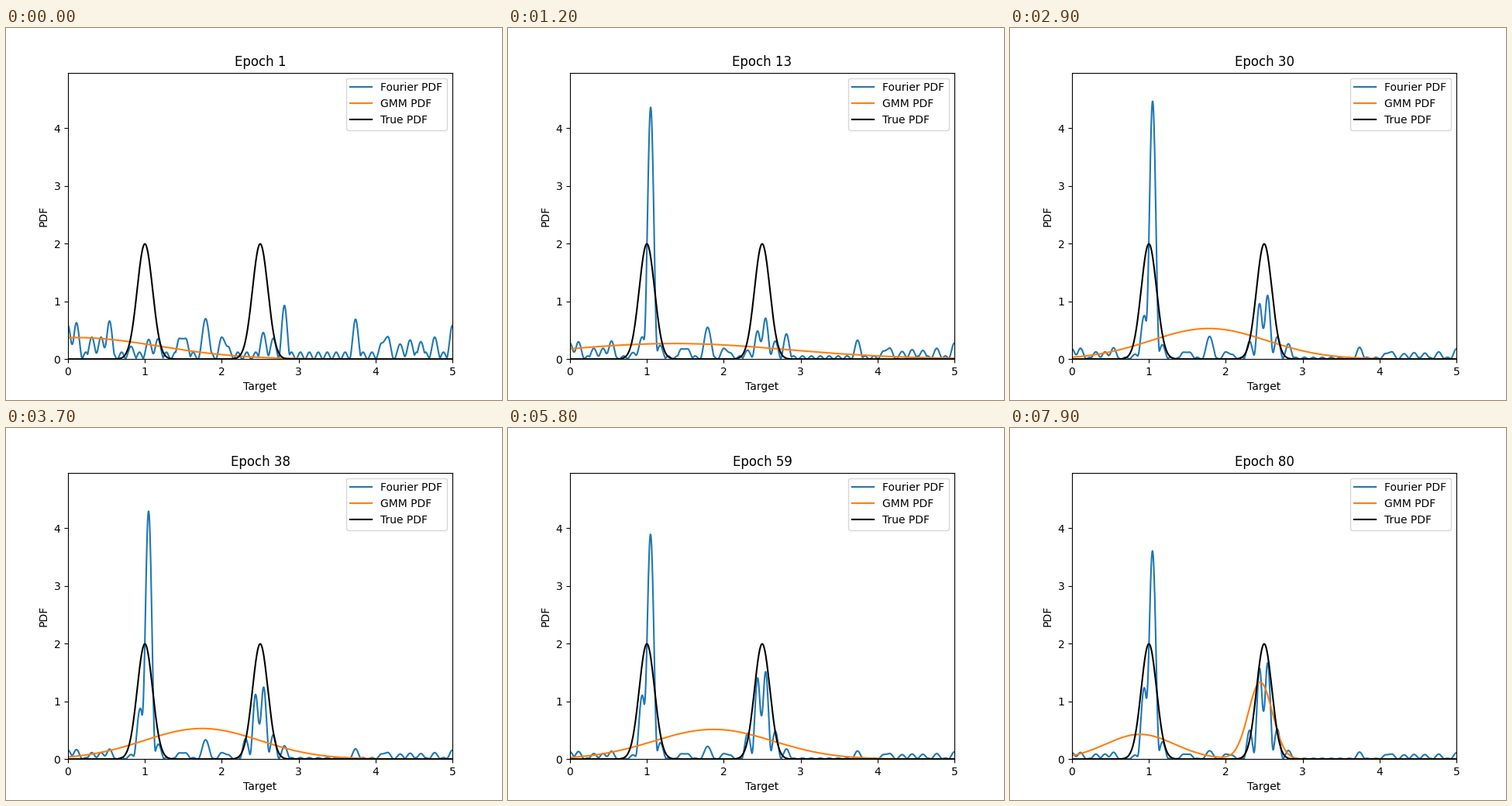
These frames come from a looping animation (640 px wide and 480 px high, 8000 ms). A matplotlib script:

```python
import numpy as np
import matplotlib.pyplot as plt
from matplotlib.animation import FuncAnimation

FRAMES = 80
PERIOD = 5
x = np.linspace(0, PERIOD, 1000)

# Random lobes before training: centre, height
initial = [
    (0, .58), (.11, .63), (.31, .38), (.43, .38), (.54, .66), (.82, .22),
    (1.05, .34), (1.17, .35), (1.45, .36), (1.53, .36), (2, .38), (2.08, .22),
    (2.54, .46), (2.67, .36), (2.815, .93), (3.74, .69), (4.08, .28),
    (4.16, .39), (4.32, .26), (4.45, .33), (4.59, .3), (4.77, .38),
]

# Lobes that training builds up: centre, limiting height
learned = [
    (.93, 1.3), (.99, .55), (1.18, .25), (2.31, .57),
    (2.44, 1.8), (2.545, 1.8), (2.67, .5),
]

# Mixture key points: epoch, mean 1, sd 1, mean 2, sd 2
mixture = np.array([
    (1, .1, 1.07, .1, 1.07), (13, 1.35, 1.48, 1.35, 1.48),
    (30, 1.78, .753, 1.78, .753), (47, 1.7, .753, 1.7, .753),
    (59, 1.6, .73, 2.11, .73), (67, 1.35, .7, 2.27, .7),
    (80, .885, .447, 2.45, .156),
])
WEIGHT = 0.48


def normal(mean, sd):
    return np.exp(-0.5 * ((x - mean) / sd) ** 2) / (sd * np.sqrt(2 * np.pi))


def lobe(center, half_width=0.079):
    """Raised-cosine lobe of height 1 on the periodic axis."""
    d = (x - center + PERIOD / 2) % PERIOD - PERIOD / 2
    return np.cos(np.pi / 2 * np.clip(d / half_width, -1, 1)) ** 2


def rise(t, tau):
    return 1 - np.exp(-t / tau)


noise = sum(h * lobe(c) for c, h in initial)
residue = sum(0.05 * lobe(c) for c, _ in initial)
fit = sum(h * lobe(c) for c, h in learned)
ripple = 0.12 * np.cos(np.pi * 43 * x / PERIOD) ** 2
spike = lobe(1.05, 0.089)
straggler = lobe(1.79, 0.1)


def fourier_pdf(t):
    fade = 1 / (1 + t / 10)
    spike_height = (2.75 + 2.6 * np.exp(-t / 60)) * rise(t, 6.2)
    lobes = (fade * noise + rise(t, 38) * (fit + residue)
             + spike_height * spike + 0.7 * np.exp(-t / 50) * straggler)
    return np.maximum(lobes, fade * ripple)


def gmm_pdf(t):
    m1, s1, m2, s2 = (np.interp(t + 1, mixture[:, 0], col)
                      for col in mixture[:, 1:].T)
    return WEIGHT * normal(m1, s1) + (1 - WEIGHT) * normal(m2, s2)


fig, ax = plt.subplots(figsize=(6.4, 4.8), dpi=100)
fourier, = ax.plot(x, fourier_pdf(0), label="Fourier PDF")
gmm, = ax.plot(x, gmm_pdf(0), label="GMM PDF")
ax.plot(x, 0.5 * normal(1, 0.1) + 0.5 * normal(2.5, 0.1),
        color="black", label="True PDF")
ax.set(xlim=(0, PERIOD), ylim=(0, 4.96), xlabel="Target", ylabel="PDF")
ax.legend(loc="upper right")
title = ax.set_title("Epoch 1")


def update(frame):
    fourier.set_ydata(fourier_pdf(frame))
    gmm.set_ydata(gmm_pdf(frame))
    title.set_text(f"Epoch {frame + 1}")
    return fourier, gmm, title


anim = FuncAnimation(fig, update, frames=FRAMES, interval=100, repeat=True)
plt.show()
```
